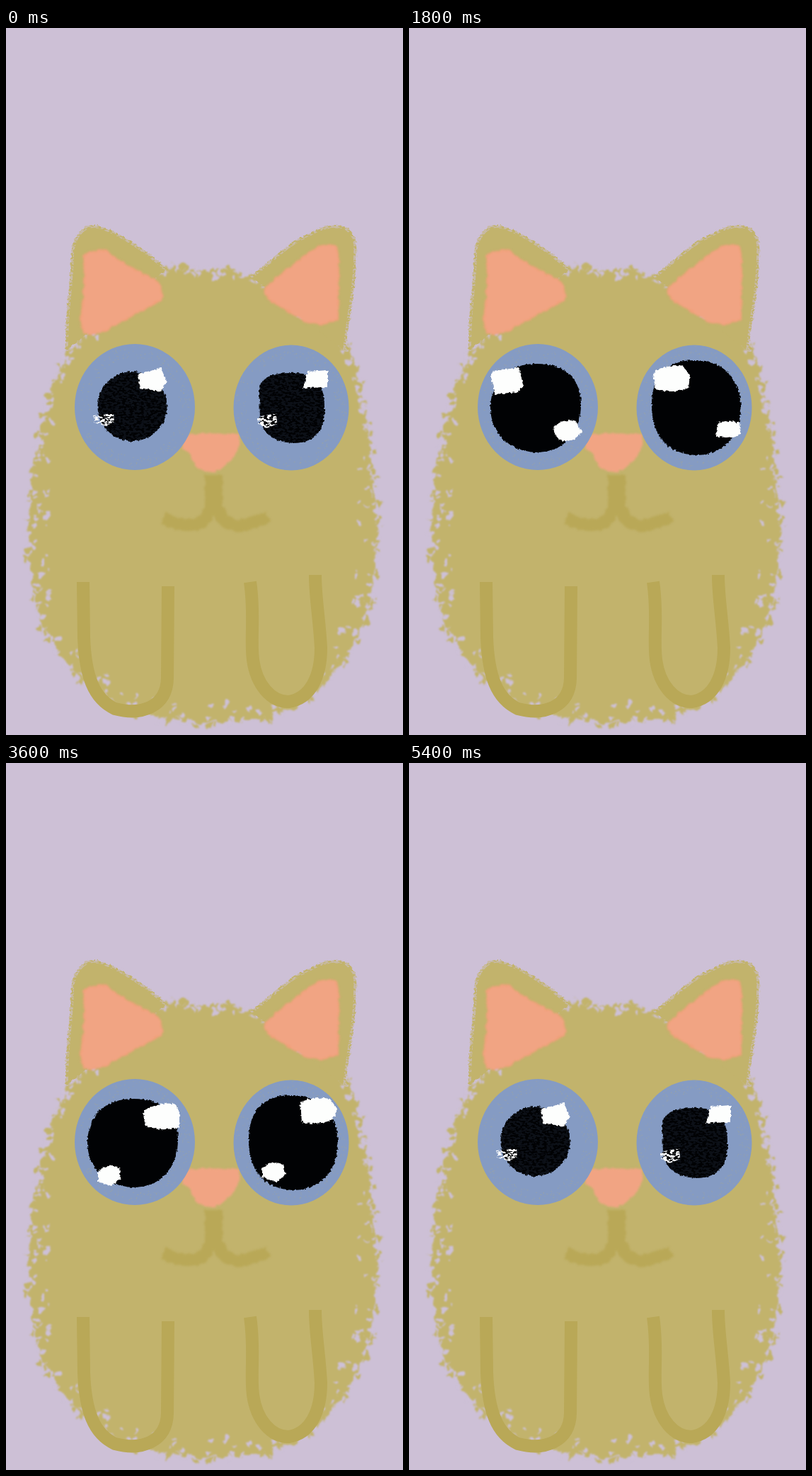
An HTML page for the animation above (6 s loop, 561x998 px).

```html
<!DOCTYPE html>
<html lang="en">
<head>
<meta charset="utf-8">
<title>Cat with shining eyes</title>
<style>
  html, body { margin: 0; width: 100%; height: 100%; overflow: hidden; background: #cdc0d6; }
  svg { display: block; width: 100vw; height: 100vh; }
  .coat { fill: #c2b36c; }
  .pink { fill: #f1a483; }
  .iris { fill: #859bc3; }
  .line { fill: none; stroke: #b9a857; }
  .pupil { fill: #010204; }
  .glint { fill: #fdfefd; }
  .pose { visibility: hidden; }
</style>
</head>
<body>
<svg viewBox="0 0 561 998" preserveAspectRatio="none">
  <defs>
    <filter id="fur" filterUnits="userSpaceOnUse" x="0" y="250" width="561" height="748" color-interpolation-filters="sRGB">
      <feTurbulence type="fractalNoise" baseFrequency=".09" numOctaves="2" seed="4"/>
      <feDisplacementMap in="SourceGraphic" scale="14" xChannelSelector="R" yChannelSelector="G"/>
      <feGaussianBlur stdDeviation="1.3"/>
    </filter>
    <filter id="chalk" filterUnits="userSpaceOnUse" x="0" y="250" width="561" height="748" color-interpolation-filters="sRGB">
      <feTurbulence type="fractalNoise" baseFrequency=".28" numOctaves="2" seed="9"/>
      <feDisplacementMap in="SourceGraphic" scale="5" xChannelSelector="R" yChannelSelector="G"/>
      <feGaussianBlur stdDeviation=".4"/>
    </filter>
    <filter id="soft" filterUnits="userSpaceOnUse" x="0" y="250" width="561" height="748" color-interpolation-filters="sRGB">
      <feTurbulence type="fractalNoise" baseFrequency=".13" numOctaves="2" seed="2"/>
      <feDisplacementMap in="SourceGraphic" scale="6" xChannelSelector="R" yChannelSelector="G"/>
      <feGaussianBlur stdDeviation="1.7"/>
    </filter>
    <filter id="scratch" filterUnits="userSpaceOnUse" x="0" y="250" width="561" height="748" color-interpolation-filters="sRGB">
      <feTurbulence type="fractalNoise" baseFrequency=".2 .35" numOctaves="2" seed="6"/>
      <feColorMatrix values="0 0 0 0 0  0 0 0 0 0  0 0 0 0 0  9 0 0 0 -4"/>
      <feComposite in="SourceGraphic" operator="in"/>
    </filter>
    <g id="ears">
      <path d="M84 456C83 400 92 360 92 318C94 295 108 277 125 278C155 283 195 311 228 340"/>
      <path d="M345 350C372 332 392 306 428 290C450 277 470 276 482 282C496 292 496 305 495 325C494 375 484 410 480 457"/>
    </g>
    <g id="smallPupils">
      <ellipse cx="178.5" cy="534" rx="49" ry="49"/>
      <path d="M358 510Q358 488 400 487Q451 484 450 535Q452 586 405 586Q368 584 359 555Z"/>
    </g>
  </defs>

  <rect width="561" height="998" fill="#cdc0d6"/>

  <g filter="url(#fur)">
    <path id="coat" class="coat" d="M480 440C500 480 511 545 518 620C527 700 525 760 511 820C495 880 458 930 400 963C340 984 260 984 200 970C132 953 83 903 53 845C29 780 29 700 38 640C46 570 59 510 87 455L215 341Q285 336 352 348Z"/>
    <path id="gaps" fill="#cdc0d6"/>
    <path id="tufts" class="coat"/>
  </g>
  <use href="#ears" class="coat" filter="url(#chalk)"/>
  <use href="#ears" fill="none" stroke="#cdc0d6" stroke-width="8" opacity=".55" filter="url(#scratch)"/>
  <g class="pink" filter="url(#soft)" stroke="#f29f7a" stroke-width="2">
    <path d="M110 320Q128 312 143 315Q160 330 180 340L215 358Q223 370 220 384Q180 405 155 419Q130 435 112 431Q104 424 107 400L112 352Z"/>
    <path d="M367 366Q400 338 440 309Q455 304 466 308Q471 320 470 340L469 411Q440 424 420 413Q395 397 376 386Q364 377 367 366Z"/>
  </g>
  <path class="pink" filter="url(#soft)" d="M247 574Q290 571 329 573Q333 588 326 597Q319 613 304 622Q292 630 278 624Q263 618 261 604Q247 592 247 574Z"/>

  <ellipse class="iris" cx="182" cy="535" rx="85" ry="89"/>
  <ellipse class="iris" cx="403" cy="536" rx="81.5" ry="88.5"/>
  <path id="flecks" fill="#a3a795" opacity=".55"/>

  <g class="line" filter="url(#soft)">
    <path stroke-width="25" d="M293.5 631V683"/>
    <path stroke-width="17" d="M288 678C284 704 255 708 222 692M299 678C308 710 335 706 370 690"/>
  </g>
  <g class="line" stroke-width="18">
    <path d="M109 782L110 860C112 915 124 947 154 961C192 971 227 958 228 918L229 788"/>
    <path d="M345 782C352 830 345 860 349 892C354 928 375 951 399 951C430 947 445 915 445 875C443 835 437 805 437 772"/>
  </g>

  <g class="pose" id="small">
    <use href="#smallPupils" class="pupil" filter="url(#chalk)"/>
    <use href="#smallPupils" fill="#1a2130" opacity=".45" filter="url(#scratch)"/>
    <g class="glint" filter="url(#chalk)">
      <path d="M187 488L219 480L227 499L219 513L189 508Z"/>
      <path d="M426 485L455 483L455 507L420 508Z"/>
    </g>
    <g class="glint" filter="url(#scratch)">
      <path d="M123 547L152 544L153 556L142 562L124 557Z"/>
      <path d="M355 549L382 544L383 559L368 565L355 558Z"/>
    </g>
  </g>

  <g class="pose" id="large">
    <g class="pupil" filter="url(#chalk)">
      <path d="M115 535C117 490 146 474 181 474C220 474 244 494 243 534C242 576 215 599 180 599C143 598 115 573 115 535Z"/>
      <path d="M343 532C343 489 365 469 404 469C446 469 469 497 469 537C468 580 441 603 405 603C366 601 343 576 343 532Z"/>
    </g>
    <g class="glint pose" id="left" filter="url(#chalk)">
      <path d="M115 489Q121 480 136 482L155 479L162 506L153 514L121 517Z"/>
      <path d="M204 563Q216 552 234 554L244 569Q238 584 218 583Q205 579 204 563Z"/>
      <path d="M345 488Q355 476 386 476L397 490L395 508Q373 517 348 510Z"/>
      <path d="M436 557Q454 553 467 557L469 573Q453 581 434 576Z"/>
    </g>
    <g class="glint pose" id="right" filter="url(#chalk)">
      <path d="M196 490Q216 478 238 481L245 491L245 514Q222 521 199 513Q192 502 196 490Z"/>
      <path d="M130 576Q144 564 160 571L162 586L149 597L130 591Z"/>
      <path d="M416 479Q436 470 457 474L468 489L461 504Q438 512 418 507Z"/>
      <path d="M362 571Q375 561 392 566L395 581L382 592L362 585Z"/>
    </g>
  </g>
</svg>
<script>
  const el = id => document.getElementById(id);
  let seed = 7;
  const random = () => (seed = seed * 16807 % 2147483647) / 2147483647;
  const dab = (x, y, w, h) =>
    `M${(x - w).toFixed(1)} ${y.toFixed(1)}q${w} ${-h} ${2 * w} 0q${-w} ${2 * h} ${-2 * w} 0`;

  // Patchy fur: gaps just inside the outline, tufts just outside it.
  function scatterFur(id, count, inner, outer) {
    const outline = el("coat"), length = outline.getTotalLength();
    let d = "";
    for (let i = 0; i < count; i++) {
      const p = outline.getPointAtLength(random() * length);
      const dx = 280 - p.x, dy = 670 - p.y, r = Math.hypot(dx, dy);
      const depth = outer + random() ** 2 * (inner - outer) * (p.y < 600 ? .5 : 1);
      d += dab(p.x + dx / r * depth, p.y + dy / r * depth, 1.5 + random() * 3, 2 + random() * 4);
    }
    el(id).setAttribute("d", d);
  }

  function scatterFlecks() {
    let d = "";
    for (let i = 0; i < 600; i++) {
      const angle = random() * 2 * Math.PI, r = .78 + random() * .2;
      const x = i % 2 ? 182 : 403;
      d += dab(x + Math.cos(angle) * r * 81, 535 + Math.sin(angle) * r * 88, .4 + random(), .8);
    }
    el("flecks").setAttribute("d", d);
  }

  scatterFur("gaps", 340, 28, -2);
  scatterFur("tufts", 130, 4, -5);
  scatterFlecks();

  const show = (id, on) => el(id).style.visibility = on ? "visible" : "hidden";

  function draw() {
    const step = Math.floor(performance.now() % 6000 / 600);
    const resting = step === 0 || step === 9;
    show("small", resting);
    show("large", !resting);
    show("left", !resting && step % 2 === 1);
    show("right", !resting && step % 2 === 0);
    requestAnimationFrame(draw);
  }
  draw();
</script>
</body>
</html>
```
